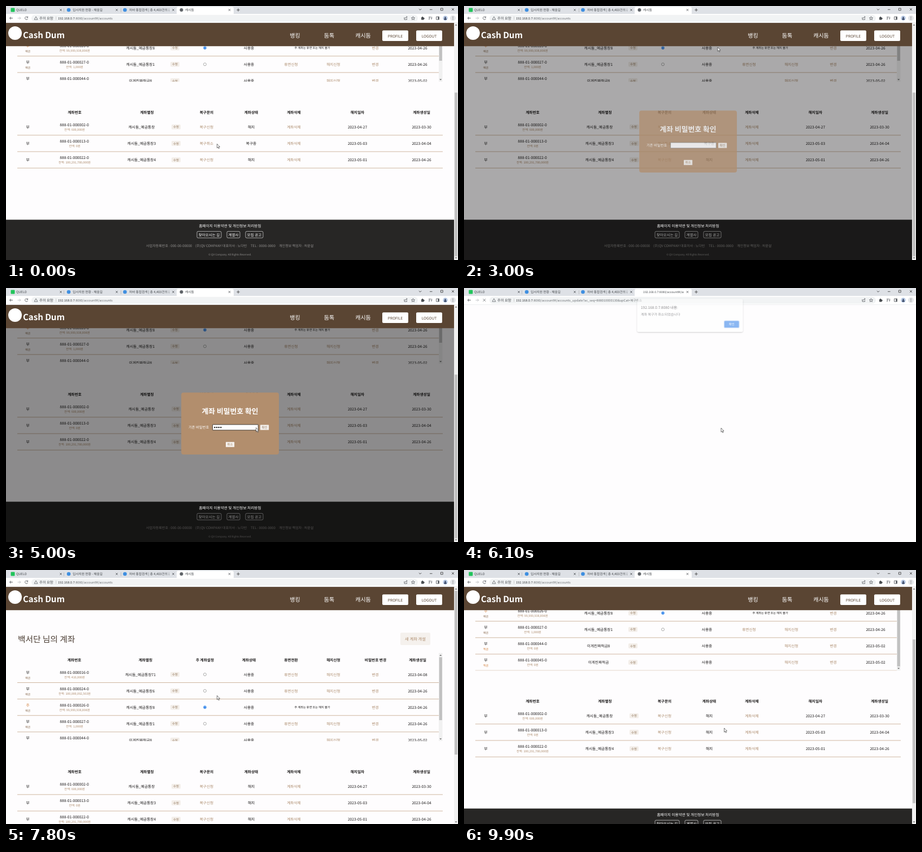
Recreate the animation shown at these times as an HTML page. Size 800 by 450 pixels, loop 10000 ms.

```html
<!DOCTYPE html>
<html>
<head>
<meta charset="utf-8">
<title>Accounts</title>
<style>
  html, body { margin: 0; width: 100%; height: 100%; overflow: hidden; background: #fefdfe; }
  svg { display: block; width: 800px; height: 450px; }
  text { font-family: "Noto Sans CJK KR", "Noto Sans CJK", "Noto Sans", sans-serif; text-rendering: geometricPrecision; }
</style>
</head>
<body>
<svg id="stage" viewBox="0 0 800 450"></svg>
<script>
const LOOP = 10000, STEP = 100;
const BASE = 6.67, TOP = 29.6;
const INK = '#1c1a1a', TAN = '#ad8c6d', LINE = '#c3a68a', BROWN = '#5a4533', ORANGE = '#cf7a34';
const HOST = '192.168.0.7', PATH = ':8080/accountM/accounts';

// Text is placed by its visual centre line.
const text = (x, y, str, { size = BASE, fill = INK, anchor = 'middle', weight = 400, id = '' } = {}) =>
  `<text ${id && `id="${id}"`} x="${x}" y="${(y + size * .39).toFixed(2)}" font-size="${size}" fill="${fill}" text-anchor="${anchor}" font-weight="${weight}">${str}</text>`;
const left = (x, y, str, opts = {}) => text(x, y, str, { anchor: 'start', ...opts });
const rect = (x, y, w, h, fill, r = 0, extra = '') =>
  `<rect x="${x}" y="${y}" width="${w}" height="${h}" fill="${fill}" rx="${r}" ${extra}/>`;
const dot = (x, y, r, fill, extra = '') => `<circle cx="${x}" cy="${y}" r="${r}" fill="${fill}" ${extra}/>`;
const stroke = (d, color = '#5f6368', w = .8) => `<path d="${d}" fill="none" stroke="${color}" stroke-width="${w}"/>`;
const rule = (x2, y) => rect(20, y, x2 - 20, .8, LINE);
const cross = (x, y, r, color) => stroke(`M${x - r} ${y - r}l${2 * r} ${2 * r}m0 ${-2 * r}l${-2 * r} ${2 * r}`, color);
const arrow = (x, y, dir) => `<path d="M${x - 2} ${y + dir}h4l-2 ${-2 * dir}z" fill="#606060"/>`;
const group = (id, body, extra = '') => `<g id="${id}" ${extra}>${body}</g>`;

const editButton = (x, y) => rect(x - 8, y - 4.3, 16, 8.6, '#f3eee9', 1.5) + text(x, y, '수정', { size: 5.4, fill: '#8e7257' });
const radio = (y, on) => on
  ? dot(352, y, 2.5, '#fff', 'stroke="#1976e8" stroke-width=".8"') + dot(352, y, 1.6, '#1976e8')
  : dot(352, y, 2.5, '#fff', 'stroke="#777" stroke-width=".6"');
const headings = (y, list) => list.map(([x, s]) => text(x, y, s, { weight: 700 })).join('');
const account = (y, no, balance) =>
  text(121, y - 3.7, `888-01-0000${no}-0`) + text(121.5, y + 4.8, `잔액: ${balance}원`, { size: 5.3, fill: TAN });

const active = [
  ['16', '410,000', '캐시둠_예금통장71', '04-08'],
  ['24', '100,000,092,503', '캐시둠_예금통장6', '04-26'],
  ['26', '99,999,938,898', '캐시둠_예금통장8', '04-26'],
  ['27', '1,000', '캐시둠_예금통장1', '04-26'],
  ['44', '0', '이게진짜적금8', '05-02'],
  ['45', '0', '이게진짜적금', '05-02']
];
const closed = [
  ['02', '600,000', '캐시둠_예금통장', '04-27', '03-30'],
  ['13', '0', '캐시둠_예금통장3', '05-03', '04-04'],
  ['22', '100,291,780,000', '캐시둠_예금통장4', '05-01', '04-26']
];

function activeRow([no, balance, name, date], i) {
  const y = 185 + i * 29.1, main = no === '26', savings = i > 3;
  const link = (x, s) => text(x, y, s, { fill: TAN });
  return text(38.5, y - 4, main ? '주' : '부', { fill: main ? ORANGE : INK }) +
    text(38.5, y + 6, savings ? '적금' : '예금', { size: 5, fill: savings ? ORANGE : '#8a6c50' }) +
    account(y, no, balance) + text(238, y, name) + editButton(299, y) +
    (savings ? '' : radio(y, main)) + text(430, y, '사용중') +
    (main ? text(542, y, '주 계좌는 휴면 또는 해지 불가', { size: 5.2 })
          : (savings ? '' : link(504.5, '휴면신청')) + link(579.5, '해지신청')) +
    link(653.5, '변경') + text(728.5, y, '2023-' + date) + rule(766, y + 14.2);
}

function closedRow([no, balance, name, end, start], i) {
  const y = 383.3 + i * 29.1, id = s => no === '13' ? s : '';
  return text(38.5, y, '부') + account(y, no, balance) + text(240, y, name) + editButton(301, y) +
    text(355, y, '복구신청', { fill: TAN, id: id('request') }) + text(434, y, '해지', { id: id('status') }) +
    text(509.5, y, '계좌삭제', { fill: TAN }) + text(622, y, '2023-' + end) +
    text(735.5, y, '2023-' + start) + rule(773, y + 14.2);
}

function footer() {
  const link = (x, w, s) => rect(x, 568.3, w, 11.6, 'none', 2, 'stroke="#ddd" stroke-width=".7"') +
    text(x + w / 2, 574, s, { size: 6.5, fill: '#fff' });
  const info = [[248, '사업자등록번호 : 000-00-00000'], [335, '(주)QV COMPANY 대표이사 : 노다빈'],
    [433, 'TEL : 0000-0000'], [483, '개인정보 책임자 : 차윤설']];
  return rect(0, 547.6, 793, 73, '#272625') + link(338, 43, '찾아오시는 길') + link(391, 23, '계열사') + link(424, 31, '모집 공고') +
    info.map(([x, s]) => left(x, 594, s, { size: 6.05, fill: '#92908f' })).join('') +
    text(396.5, 609.5, '© QV Company. All Rights Reserved.', { size: 4.6, fill: '#92908f' });
}

const page = () =>
  left(21, 122, '백서단 님의 계좌', { size: 14.7, fill: '#4b3d33' }) +
  rect(698, 111, 53, 22, '#f5f1ed', 2) + text(724.5, 122, '새 계좌 개설', { size: 7.3, fill: TAN, weight: 500 }) +
  `<g clip-path="url(#tableClip)">` + group('rows',
    headings(159, [[121, '계좌번호'], [247, '계좌별칭'], [352, '주 계좌설정'], [430, '계좌상태'], [504.5, '휴면전환'],
      [579.5, '해지신청'], [654, '비밀번호 변경'], [728.5, '계좌생성일']]) + active.map(activeRow).join('')) + '</g>' +
  rect(766, 147, 6.5, 156, '#f1f1f1') + arrow(769.2, 151, 1) + arrow(769.2, 299.5, -1) +
  rect(766.7, 154.5, 5.2, 111.5, '#c1c1c1', 0, 'id="tableThumb"') +
  headings(357.2, [[121.5, '계좌번호'], [249.5, '계좌별칭'], [355, '복구문의'], [434, '계좌상태'], [509.5, '계좌삭제'],
    [622, '해지일자'], [735.5, '계좌생성일']]) + closed.map(closedRow).join('') + footer();

const siteHeader = () => {
  const button = (x, s) => rect(x, 43.2, 46, 18.8, '#fff', 2) + text(x + 23, 53, s, { fill: BROWN });
  const nav = (x, s) => text(x, 52, s, { size: 10, fill: '#fff', weight: 500 });
  return rect(0, TOP, 793, 71.2 - TOP, BROWN) + dot(16, 48, 12, '#fff') +
    left(30, 51, 'Cash Dum', { size: 15, fill: '#fff', weight: 700 }) +
    nav(511.5, '뱅킹') + nav(572, '둠톡') + nav(632, '캐시둠') + button(666, 'PROFILE') + button(726, 'LOGOUT');
};

const scrollbar = () => rect(793, TOP, 7, 421, '#f1f1f1') + arrow(796.5, 33.5, 1) + arrow(796.5, 446.5, -1) +
  rect(794, 37, 5, 290, '#c1c1c1', 0, 'id="pageThumb"');

function browser() {
  const small = { size: 5.7, fill: '#45494d' };
  const icon = d => stroke(d, '#5f6368', .9);
  return rect(0, 0, 800, 14.5, '#dee1e6') + rect(0, 14, 800, TOP - 14, '#fff') + rect(302, 1.5, 101, 14, '#fff', 3) +
    rect(45, 15.8, 684, 12, '#f1f3f4', 6) +
    rect(8.5, 3.5, 7, 7, '#21c45b', 1) + dot(111, 7, 3.3, '#3f8fe0') + dot(210.5, 7, 3.3, '#3f8fe0') +
    left(18, 7, 'QUELO', small) + left(118, 7, '입사지원 현황 - 채움길', small) +
    `<g clip-path="url(#tabClip)">${left(218, 7, '자바 통합검색 | 총 4,403건의 검색', small)}
    ${left(317, 7, '캐시둠', { ...small, id: 'siteTitle' })}${left(317, 7, HOST + PATH, { ...small, size: 5.2, id: 'urlTitle' })}</g>` +
    dot(310.5, 7, 3, '#5f6368', 'id="tabIcon"') +
    [97, 196, 296, 395.5].map(x => cross(x, 7, 1.7, '#45494d')).join('') +
    rect(102.5, 4, .5, 7, '#9a9da1') + rect(203, 4, .5, 7, '#9a9da1') +
    stroke('M411 4.3v5.4M408.3 7h5.4M730.8 5l2.2 2.2l2.2-2.2M750 6.3h4.5M769.4 4h3.8v3.8h-3.8z', '#333') + cross(791, 6, 2, '#333') +
    icon('M12 21.5h-5.5m2.5-2.5l-2.5 2.5l2.5 2.5') + stroke('M20.5 21.5h5.5m-2.5-2.5l2.5 2.5l-2.5 2.5', '#b9bbbe') +
    group('reload', icon('M38.3 20A2.6 2.6 0 1 0 38.6 22.4M38.6 18.5v2h-2')) + group('stop', cross(36, 21.5, 2.3, '#5f6368')) +
    `<path d="M53 18.8l3 5.2h-6z" fill="none" stroke="#5f6368" stroke-width=".8"/>` +
    left(59, 21.6, '주의 요함', { ...small, size: 6.3 }) + rect(88, 18.5, .5, 6, '#aaa') +
    `<text x="92" y="23.7" font-size="5.62" fill="#35383c">${HOST}<tspan id="path" fill="#6b6f73"></tspan></text>` +
    icon('M705 20v4h4.5v-2M706.5 22q.5-2.5 3.5-2.5m-1.3-1.4l1.5 1.4l-1.5 1.4') +
    icon('M720.5 18.7l.9 2l2.1.2l-1.6 1.4l.5 2.1l-1.9-1.1l-1.9 1.1l.5-2.1l-1.6-1.4l2.1-.2z') +
    rect(735, 20, 4.6, 4.5, '#4b4f53', .6) + dot(737, 19.8, 1.1, '#4b4f53') + dot(739.7, 22.2, 1.1, '#4b4f53') +
    icon('M748 19.5h4M748 21.5h3M748 23.5h2M753.5 19v4h-1.5') +
    icon('M761.5 19h5v5h-5z') + rect(764.3, 19, 2.4, 5, '#5f6368') +
    dot(777.5, 21.5, 4.2, '#b9cbe6') + dot(777.5, 20.5, 1.3, '#33415c') + rect(775.3, 22, 4.4, 2.5, '#33415c', 1.2) +
    dot(791, 21.5, 5, '#e3e5e8') + [19.4, 21.5, 23.6].map(y => dot(791, y, .6, '#444')).join('') + rect(0, 29.1, 800, .5, '#dadce0');
}

function dialog(id, message, confirmX, cancel) {
  return group(id, rect(306.5, 24, 187, 58.3, '#fff', 2.5, 'filter="url(#shadow)"') +
    left(313, 39.2, HOST + ':8080 내용:', { size: 6.5, fill: '#202124' }) +
    left(313, 50.8, message, { size: 6.05, fill: '#3c4043' }) +
    rect(confirmX - 13.9, 61.9, 27.8, 13.8, '#a9c9f7', 2.2) + rect(confirmX - 12.8, 63, 25.6, 11.6, '#1a73e8', 1.6) +
    text(confirmX, 68.8, '확인', { size: 5.4, fill: '#fff' }) +
    (cancel ? rect(461, 63, 25.5, 11.6, '#fff', 1.6, 'stroke="#dadce0" stroke-width=".5"') +
      text(473.5, 68.8, '취소', { size: 5.4, fill: '#1a73e8' }) : ''));
}

const modal = () => rect(310.2, 185.2, 172.8, 109.8, '#b28e6d', 4) +
  text(396.5, 218, '계좌 비밀번호 확인', { size: 12.8, fill: '#fff', weight: 700 }) +
  left(323, 247, '기존 비밀번호', { size: 6.3, fill: '#fff' }) +
  rect(365.6, 242, 80.7, 9.8, '#fff', .5, 'id="field" stroke="#777" stroke-width=".7"') +
  [0, 1, 2, 3].map(i => dot(369.5 + i * 3.6, 247, 1.25, '#222', `id="pin${i}"`)).join('') +
  rect(450, 242.5, 15.2, 9, '#f5f1ed', .6) + text(457.6, 247, '확인', { size: 5.5, fill: '#8e7257' }) +
  rect(389, 272.8, 15.2, 9, '#f5f1ed', .6) + text(396.6, 277.3, '취소', { size: 5.5, fill: '#a5835f' });

const outline = 'fill="#fff" stroke="#222" stroke-width=".6" stroke-linejoin="round"';
const pointer = group('arrowCursor', `<path d="M0 0v7.2l1.6-1.5l1.2 2.6l1.2-.5l-1.2-2.6h2.2z" ${outline}/>`) +
  group('handCursor', `<path d="M0 0q.8-.7 1.4 0v3l3 .6q.8.2.7 1l-.6 3.8h-4l-2.5-3.3q.4-.9 2 .2z" ${outline}/>`) +
  group('textCursor', stroke('M-1.3-3.5h2.6M0-3.5v7M-1.3 3.5h2.6', '#222', .6));

document.getElementById('stage').innerHTML =
  `<defs><clipPath id="tableClip"><rect x="0" y="147" width="766" height="156.3"/></clipPath>
  <clipPath id="tabClip"><rect x="205" y="0" width="84" height="15"/><rect x="310" y="0" width="79" height="15"/></clipPath>
  <filter id="shadow" x="-10%" y="-20%" width="120%" height="150%"><feDropShadow dx="0" dy="1" stdDeviation="1.3" flood-opacity=".4"/></filter></defs>` +
  rect(0, 0, 800, 450, '#fefdfe') +
  group('site', group('page', page()) + rect(0, 71, 793, 379, '#000', 0, 'id="shade"') +
    group('policy', text(396.5, 558.3, '홈페이지 이용약관 및 개인정보 처리방침', { fill: '#fff', weight: 500 })) +
    siteHeader() + scrollbar() + group('modal', modal())) +
  browser() + dialog('ask', '계좌 복구를 취소하시겠습니까?', 443, true) + dialog('done', '계좌 복구가 취소되었습니다', 473.7, false) +
  group('pointer', pointer);

const el = {};
document.querySelectorAll('[id]').forEach(node => el[node.id] = node);

// Keys are [time, ...values]; each span eases in and out.
function track(keys, t) {
  const i = keys.findIndex(k => k[0] > t);
  if (i === 0) return keys[0].slice(1);
  if (i < 0) return keys[keys.length - 1].slice(1);
  const a = keys[i - 1], b = keys[i], p = (t - a[0]) / (b[0] - a[0]), e = p * p * (3 - 2 * p);
  return a.slice(1).map((v, n) => v + (b[n + 1] - v) * e);
}

const MOUSE = [[0, 373.5, 244.3], [200, 358, 244], [1500, 358, 244], [2100, 450, 73], [2900, 450, 73], [3200, 446, 73],
  [3800, 407, 246], [4800, 407, 246], [5100, 455, 248], [6300, 455, 248], [6800, 474, 69], [7100, 474, 69],
  [7700, 373.5, 222.5], [8100, 373.5, 222.5], [8500, 397, 309], [8600, 397, 309], [8800, 398, 319.3], [9100, 398, 319.3], [9800, 460.5, 280]];
const PAGE_SCROLL = [[9000, 0], [9300, 41.7], [9600, 83.4], [9900, 125]];
const TABLE_SCROLL = [[8000, 0], [8500, 42]];
const ASK = [[1300, 0], [1600, 1]], DONE = [[6000, 0], [6200, 1]], MODAL = [[2800, 0], [3100, 1]];

const show = (node, on) => node.style.display = on ? '' : 'none';
const move = (node, x, y) => node.setAttribute('transform', `translate(${x} ${y})`);
const label = (node, s) => { if (node.textContent !== s) node.textContent = s; };

function render(t) {
  const within = (a, b) => t >= a && t < b;
  const loading = within(5900, 7200), updated = t >= 5900;
  const scroll = updated ? track(PAGE_SCROLL, t)[0] : 169, inner = track(TABLE_SCROLL, t)[0];

  show(el.site, !loading);
  move(el.page, 0, -scroll);
  move(el.policy, 0, -scroll);
  move(el.rows, 0, -inner);
  move(el.pageThumb, 0, scroll * .689);
  move(el.tableThumb, 0, inner * .71);
  label(el.request, updated ? '복구신청' : '복구취소');
  label(el.status, updated ? '해지' : '복구중');
  el.request.setAttribute('fill', within(200, 2900) ? INK : TAN);

  label(el.path, PATH + (loading ? '_update?ac_seq=888010000130&upCat=복구취소' : ''));
  [el.siteTitle, el.tabIcon, el.reload].forEach(node => show(node, !loading));
  [el.urlTitle, el.stop].forEach(node => show(node, loading));

  const asked = track(ASK, t)[0], finished = track(DONE, t)[0], entered = track(MODAL, t)[0];
  show(el.ask, t < 2900);
  el.ask.setAttribute('opacity', asked);
  move(el.ask, 0, (asked - 1) * 9);
  show(el.done, within(6000, 7000));
  el.done.setAttribute('opacity', finished);
  move(el.done, 0, (finished - 1) * 9);
  show(el.modal, within(2900, 5900));
  show(el.shade, within(2900, 5900));
  el.modal.setAttribute('opacity', entered);
  el.shade.setAttribute('opacity', entered * .45);
  el.field.setAttribute('stroke', within(4000, 5100) ? '#111' : '#777');
  for (let i = 0; i < 4; i++) show(el['pin' + i], t >= 4400 + i * 100);

  const [x, y] = track(MOUSE, t);
  const hand = within(200, 1500) || within(5100, 5900), beam = within(3800, 4900);
  move(el.pointer, x, y);
  show(el.handCursor, hand);
  show(el.textCursor, beam);
  show(el.arrowCursor, !hand && !beam);
}

const start = performance.now();
function tick() {
  const t = (performance.now() - start) % LOOP;
  render(Math.floor(t / STEP) * STEP);
  requestAnimationFrame(tick);
}
tick();
</script>
</body>
</html>
```
